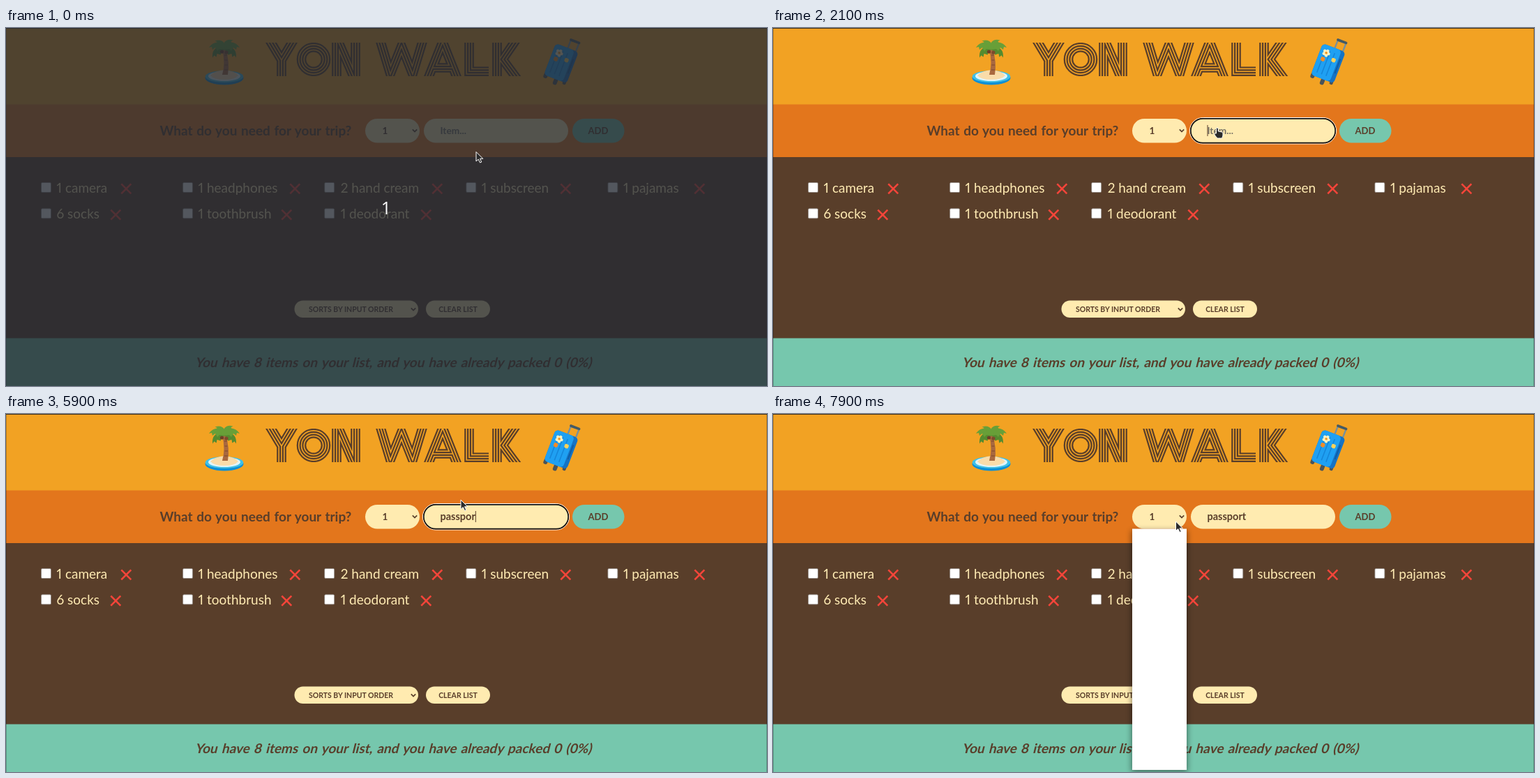
These frames come from a looping animation (1091 by 513 pixels, 8 s). An HTML page:

```html
<!DOCTYPE html>
<html lang="en">
<head>
<meta charset="utf-8">
<title>Packing list</title>
<style>
  html, body { margin: 0; width: 100%; height: 100%; overflow: hidden; background: #593e2a; }
  svg { display: block; width: 1091px; height: 513px; }
  text { font-family: Lato, "Open Sans", sans-serif; white-space: pre; }
  .bold { font-weight: 700; fill: #593e2a; }
  .mid { text-anchor: middle; }
  .small { font-size: 10.5px; }
  .pill { fill: #ffebb0; }
  .line { fill: none; stroke: #593e2a; }
  .item { font-size: 19px; fill: #ffebb3; font-variant-numeric: proportional-nums; }
  .cross { fill: none; stroke: #f5453a; stroke-width: 2.6; }
  .cursor { fill: #2b2b2b; stroke: #fff; stroke-width: 1; stroke-linejoin: round; }
</style>
</head>
<body>
<svg viewBox="0 0 1091 513">
  <defs>
    <clipPath id="titleBox"><rect x="365" y="21" width="380" height="48"/></clipPath>
    <filter id="blur" x="-50%" y="-10%" width="200%" height="120%"><feGaussianBlur stdDeviation="4"/></filter>
    <path id="chevron" d="M-3.2 -1.7L0 1.6L3.2 -1.7" class="line" stroke-width="1.7"/>
    <path id="frond" d="M0 1C1 -10 14 -14 22 -2L18 -3L17 1L13 -2L10 3L7 0Z"/>
  </defs>

  <rect width="1091" height="110" fill="#f2a223"/>
  <rect y="109.500" width="1091" height="76" fill="#e3761c"/>
  <rect y="185" width="1091" height="260" fill="#593e2a"/>
  <rect y="444.500" width="1091" height="69" fill="#76c7ad"/>

  <g id="title" clip-path="url(#titleBox)" fill="none" role="img" aria-label="YON WALK"></g>

  <!-- island -->
  <g>
    <ellipse cx="313" cy="71.500" rx="27.500" ry="10" fill="#0c8fd6"/>
    <ellipse cx="313" cy="69.500" rx="27.300" ry="8.500" fill="#40c0e7"/>
    <ellipse cx="313" cy="69" rx="23" ry="7" fill="#e1f5fa"/>
    <path d="M293 68Q300 61 313 60Q327 61 333 68Q328 74 313 74Q298 74 293 68Z" fill="#f9dcaa"/>
    <path d="M310 67Q315 50 310 31L315 30Q321 49 318 67Z" fill="#a9683f"/>
    <path d="M313 60h5M313.500 53h4.500M313.500 46h4M313 39h4" stroke="#7d4a2b"/>
    <g transform="translate(313 30)">
      <g fill="#558b2f">
        <use href="#frond" transform="rotate(42) scale(.95)"/>
        <use href="#frond" transform="scale(-1 1) rotate(42) scale(.95)"/>
      </g>
      <g fill="#689f38">
        <use href="#frond"/>
        <use href="#frond" transform="scale(-1 1)"/>
        <use href="#frond" transform="rotate(-40) scale(.8)"/>
        <use href="#frond" transform="scale(-1 1) rotate(-35) scale(.8)"/>
      </g>
    </g>
    <circle cx="309.500" cy="34" r="2.600" fill="#6d3f26"/>
    <circle cx="316" cy="35" r="2.600" fill="#7d4a2b"/>
  </g>

  <!-- suitcase -->
  <g transform="translate(795.500 50.500) rotate(21)">
    <path d="M1.500 -24V-36H14V-24" fill="none" stroke="#78909c" stroke-width="2.400"/>
    <path d="M1.500 -36.500H14" stroke="#455a64" stroke-width="3.600" stroke-linecap="round"/>
    <g fill="#4a5459">
      <rect x="-17" y="20" width="6" height="8" rx="2.500"/>
      <rect x="-1" y="23" width="6" height="9" rx="2.500"/>
      <rect x="12" y="19" width="5" height="8" rx="2"/>
    </g>
    <rect x="-17" y="-24" width="35" height="48" rx="5" fill="#1673c4"/>
    <rect x="-17" y="-24" width="29" height="48" rx="5" fill="#1fa0f2"/>
    <path d="M-10 -17V18M-3 -17V18M4 -17V18" stroke="#1585d8" stroke-width="1.500"/>
    <g id="flower" fill="#fff3c4"></g>
    <circle cx="-7.500" cy="-13" r="1.800" fill="#f59b23"/>
    <rect x="-12" y="-6" width="6" height="6" rx="2" fill="#f28c28"/>
    <rect x="3" y="-10" width="6" height="6" rx="2" fill="#ffd35a"/>
    <path d="M14.500 -12V10" stroke="#0d5ea8" stroke-width="2"/>
  </g>

  <text x="220.500" y="154" class="bold" font-size="19" word-spacing="1">What do you need for your trip?</text>
  <rect x="515" y="130" width="78" height="34.500" rx="17.250" class="pill"/>
  <text x="543.500" y="152" class="bold mid" font-size="13.500">1</text>
  <use href="#chevron" x="586" y="147"/>
  <rect x="599" y="130" width="207" height="34.500" rx="17.250" class="pill"/>
  <g id="ring" fill="none">
    <rect x="597.500" y="128.500" width="210" height="37.500" rx="18.750" stroke="#fff"/>
    <rect x="598.800" y="129.800" width="207.400" height="34.900" rx="17.450" stroke="#101010" stroke-width="1.700"/>
  </g>
  <text id="hint" x="622.500" y="152" font-size="13.700" font-weight="700" fill="#757063">Item...</text>
  <text id="entry" x="622.500" y="152" class="bold" font-size="14.500"></text>
  <rect id="caret" y="139" width="1" height="16" fill="#593e2a"/>
  <rect x="812" y="130" width="74.500" height="34.500" rx="17.250" fill="#76c7ad"/>
  <text x="849" y="152" class="bold mid" font-size="13">ADD</text>

  <g id="items"></g>

  <rect x="413.500" y="390.500" width="177.500" height="24.500" rx="12.250" class="pill"/>
  <text x="494.500" y="406.800" class="bold mid small">SORTS BY INPUT ORDER</text>
  <use href="#chevron" x="584" y="403"/>
  <rect x="602" y="390.500" width="92" height="24.500" rx="12.250" class="pill"/>
  <text x="648" y="406.800" class="bold mid small">CLEAR LIST</text>

  <text transform="translate(555 486) skewX(-14)" class="bold mid" font-size="19" word-spacing="1.500">You have 8 items on your list, and you have already packed 0 (0%)</text>

  <path d="M.5 0V513M1090.500 0V513" stroke="#000" stroke-opacity=".25"/>
  <rect width="1091" height="1" fill="#1c1a18" fill-opacity=".8"/>

  <g id="menu">
    <rect x="514" y="167" width="80" height="346" fill="#000" opacity=".45" filter="url(#blur)"/>
    <rect x="515" y="164.500" width="78" height="345.500" fill="#fff"/>
  </g>

  <g id="countdown">
    <rect width="1091" height="513" fill="#252a33" fill-opacity=".79"/>
    <text x="545" y="267" class="mid" font-size="25" fill="#fff" style="font-family:'Open Sans',sans-serif">1</text>
  </g>

  <path id="arrow" class="cursor" d="M0 0V13.500L3.200 10.600L5.600 15.500L7.800 14.500L5.500 9.800H9.800Z"/>
  <path id="hand" class="cursor" d="M-1.500 8V1.400a1.400 1.400 0 0 1 2.800 0V5l5 1q1.700 .4 1.700 2v3q0 3 -2.500 4h-5q-2 -1 -4.500 -5q-.8 -1.600 .6 -1.800z"/>
</svg>

<script>
const $ = id => document.getElementById(id);
const add = (parent, tag, attrs, text = "") => {
  const el = document.createElementNS("http://www.w3.org/2000/svg", tag);
  for (const key in attrs) el.setAttribute(key, attrs[key]);
  el.textContent = text;
  parent.append(el);
};

// Nested strokes turn each letter into four parallel lines.
const letters = [
  "M374 11L395 46L416 11M395 46V80",
  "M423.5 45a17.5 17.3 0 1 1 35 0a17.5 17.3 0 1 1 -35 0",
  "M474 80V14L501 76V10",
  "M534 10L551 66L567 26L583 66L600 10",
  "M602 80L626 20L650 80M612 57H640",
  "M664 10V62.2H692",
  "M704 10V80M736 10L712 45L738 80"
].join("");
[13.6, 9.2, 6, 1.6].forEach((width, i) => add($("title"), "path", {
  d: letters, stroke: i % 2 ? "#f2a223" : "#593e2a", "stroke-width": width
}));

for (let i = 0; i < 5; i++) {
  const a = i * Math.PI * 2 / 5;
  add($("flower"), "circle", { cx: -7.5 + 3.4 * Math.cos(a), cy: -13 + 3.4 * Math.sin(a), r: 2.3 });
}

// label, cross position
const items = [
  ["1 camera", 172], ["1 headphones", 414], ["2 hand cream", 618], ["1 subscreen", 802], ["1 pajamas", 994],
  ["6 socks", 157], ["1 toothbrush", 402], ["1 deodorant", 602]
];
items.forEach(([label, cross], i) => {
  const col = i % 5, x = 50.5 + col * 203.1, y = 229 + 37.3 * Math.floor(i / 5);
  const box = { x, y: y - 7.5, width: 14, height: 14, rx: 1.5, fill: "#fff", stroke: "#8a817a", "stroke-width": .8 };
  add($("items"), "rect", box);
  add($("items"), "text", { x: x + (col === 2 ? 23 : 22), y: y + 6.7, class: "item" }, label);
  add($("items"), "path", { d: `M${cross - 6.7} ${y - 5.7}l14 14m0 -14l-14 14`, class: "cross" });
});

const LOOP = 8000;
const typed = [[2300, 1], [3100, 2], [3400, 3], [3700, 4], [5400, 5], [5500, 6], [5900, 7], [6100, 8]];
const caretOn = [[1000, 1500], [2100, 2900], [3100, 4400], [5000, 6700], [7200, 7900]];
// start, end, target x, target y
const moves = [[300, 1000, 637, 143], [4500, 4800, 652, 123], [7100, 7700, 577.5, 154]];

const ease = u => u * u * (3 - 2 * u);
const show = (id, on) => { $(id).style.display = on ? "" : "none"; };

function pointer(t) {
  let x = 674, y = 177.5;
  for (const [from, to, tx, ty] of moves) {
    const u = ease(Math.min(1, Math.max(0, (t - from) / (to - from))));
    x += (tx - x) * u;
    y += (ty - y) * u;
  }
  return [x, y];
}

function draw(time) {
  const t = Math.floor(time % LOOP / 100) * 100;
  const open = t >= 7900;
  const count = typed.filter(([at]) => t >= at).length;

  $("entry").textContent = "passport".slice(0, count);
  $("caret").setAttribute("x", 622.5 + (count ? $("entry").getComputedTextLength() : 0));
  show("hint", !count);
  show("caret", caretOn.some(([from, to]) => t >= from && t < to));
  show("ring", t >= 1000 && !open);
  show("menu", open);
  show("countdown", t < 100);

  const [x, y] = pointer(t);
  const overField = y > 130 && y < 164 && (x > 599 && x < 806 || x > 515 && x < 593);
  const hand = overField && !open;
  show("hand", hand);
  show("arrow", !hand);
  $(hand ? "hand" : "arrow").setAttribute("transform", `translate(${x} ${y})`);
}

const start = performance.now();
function tick() {
  draw(performance.now() - start);
  requestAnimationFrame(tick);
}
tick();
</script>
</body>
</html>
```
